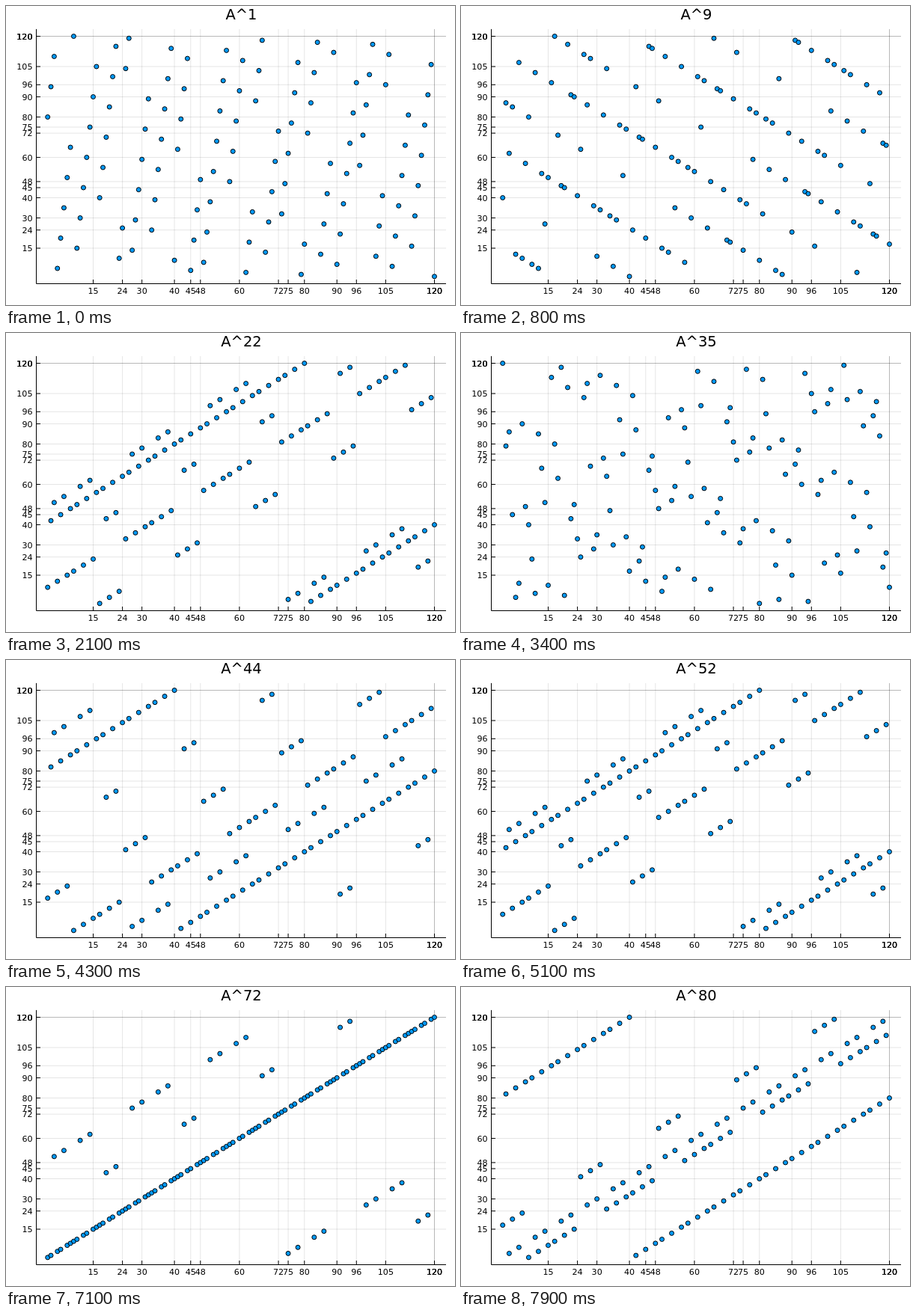
Write an HTML page that moves like this. It is 600 px wide and 400 px high and loops after 8 s.

```html
<!DOCTYPE html>
<html lang="en">
<head>
<meta charset="utf-8">
<title>Powers of a permutation</title>
<style>
  html, body { margin: 0; width: 100%; height: 100%; overflow: hidden; background: #fff; }
  svg { display: block; }
  text { font: 11.1px "DejaVu Sans", sans-serif; }
  #title { font-size: 19.44px; text-anchor: middle; }
  .grid { stroke: #000; stroke-opacity: .1; }
  .axis { stroke: #000; fill: none; }
  circle { fill: #009afa; stroke: #000; }
</style>
</head>
<body>
<svg width="600" height="400" viewBox="0 0 600 400">
  <g id="plot"></g>
  <path class="axis" d="M40.5 30.9V371.5H588"/>
  <g id="dots"></g>
  <text id="title" x="314.5" y="17.8"></text>
</svg>
<script>
const SIZE = 120, STEP = 100, FRAMES = 80;
const LEFT = 40.5, RIGHT = 588, TOP = 30.9, BOTTOM = 371.5;
// 120 is a repeated tick, so its line and label come out darker
const ticks = [15, 24, 30, 40, 45, 48, 60, 72, 75, 80, 90, 96, 105, 120, 120, 120];

const px = v => 51.36 + 4.3429 * v;
const py = v => 364.5 - 2.7 * v;
const byId = id => document.getElementById(id);

function add(parent, tag, attrs, text = '') {
  const el = document.createElementNS('http://www.w3.org/2000/svg', tag);
  for (const key in attrs) el.setAttribute(key, attrs[key]);
  el.textContent = text;
  return parent.appendChild(el);
}

const plot = byId('plot');
for (const v of ticks) {
  const x = px(v), y = py(v);
  add(plot, 'path', { class: 'grid', d: `M${x} ${TOP}V${BOTTOM}M${LEFT} ${y}H${RIGHT}` });
  add(plot, 'path', { class: 'axis', d: `M${x} ${BOTTOM}v-5.5M${LEFT} ${y}h5.5` });
  add(plot, 'text', { x, y: 385, 'text-anchor': 'middle' }, v);
  add(plot, 'text', { x: 35.5, y: y + 4, 'text-anchor': 'end' }, v);
}

// Zero-based permutation: digits in mixed radix (5, 3, 8) recombined modulo 120
function permute(i) {
  const a = Math.floor(i / 24), b = Math.floor(i / 8) % 3, c = i % 8;
  return (79 + 24 * a + 40 * b + 15 * c) % SIZE;
}

const dots = Array.from({ length: SIZE }, (_, i) =>
  add(byId('dots'), 'circle', { cx: px(i + 1), r: 3 }));

let shown = 0;
function draw() {
  const power = 1 + Math.floor(performance.now() / STEP) % FRAMES;
  if (power !== shown) {
    shown = power;
    byId('title').textContent = 'A^' + power;
    dots.forEach((dot, i) => {
      let v = i;
      for (let n = 0; n < power; n++) v = permute(v);
      dot.setAttribute('cy', py(v + 1));
    });
  }
  requestAnimationFrame(draw);
}
draw();
</script>
</body>
</html>
```
